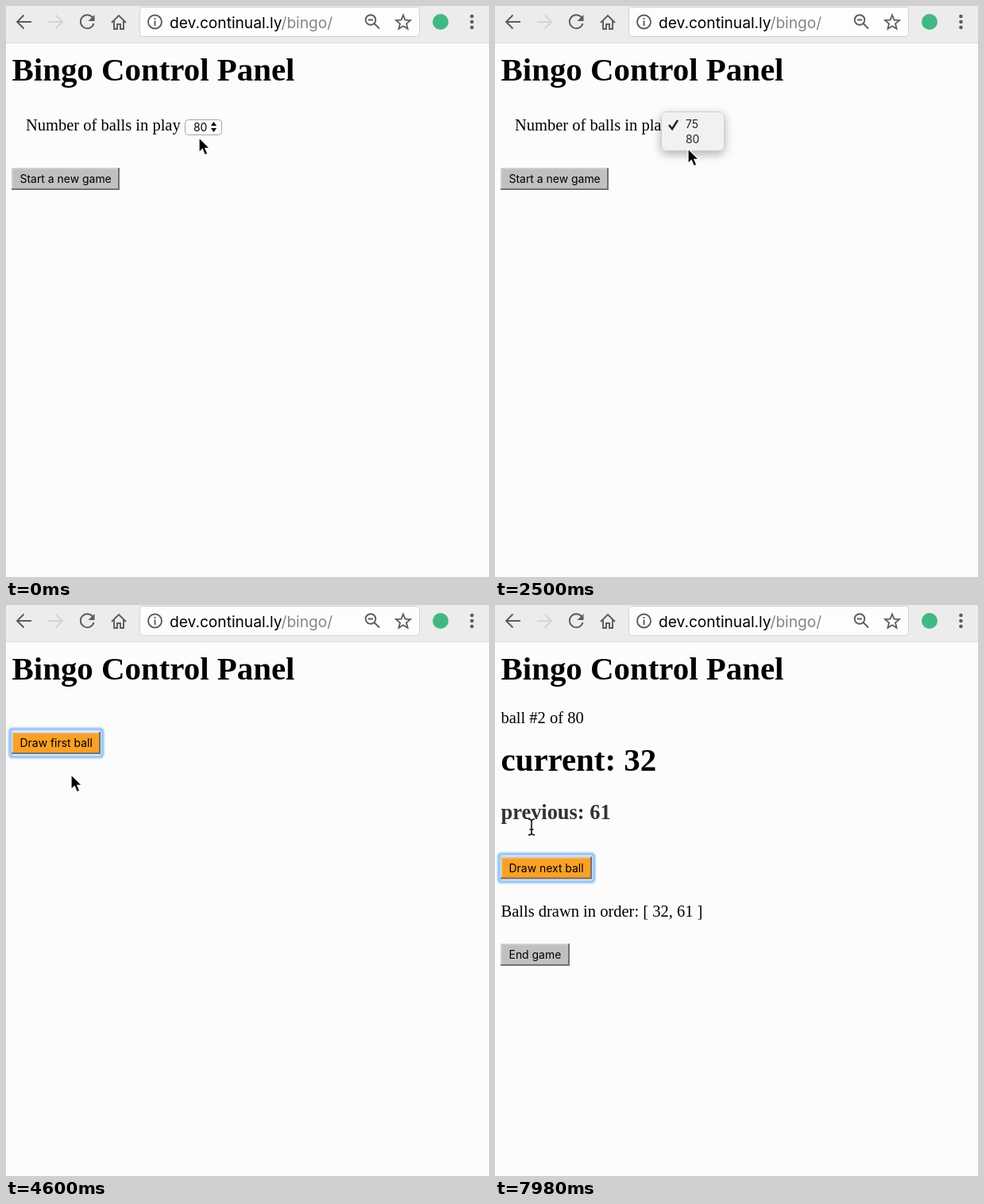
An HTML page for the animation above (8 s loop, 608 by 720 pixels).

```html
<!DOCTYPE html>
<html lang="en">
<head>
<meta charset="utf-8">
<title>Bingo Control Panel</title>
<style>
  html, body { margin: 0; height: 100%; overflow: hidden; background: #fcfcfc; }
  svg { display: block; width: 608px; height: 720px; }
  text { font: 20.5px "Liberation Serif", serif; white-space: pre; }
  .h1 { font-size: 40.9px; font-weight: bold; }
  .h2 { font-size: 26.4px; font-weight: bold; fill: #333; }
  .ui { font: 13.95px Inter, sans-serif; }
  .url { font: 19.15px Inter, sans-serif; }
  .icon { fill: none; stroke: #5c5c5c; stroke-width: 1.9; }
  .ring { fill: none; stroke: #86bdf0; stroke-width: 3.6; filter: url(#soft); }
</style>
</head>
<body>
<svg viewBox="0 0 608 720">
  <defs>
    <filter id="soft" x="-20%" y="-40%" width="140%" height="180%"><feGaussianBlur stdDeviation="0.8"/></filter>
    <filter id="shadow" x="-40%" y="-50%" width="180%" height="220%">
      <feDropShadow dx="0" dy="4" stdDeviation="6" flood-color="#000" flood-opacity=".3"/>
    </filter>
  </defs>

  <rect width="608" height="720" fill="#fcfcfc"/>
  <rect width="608" height="46" fill="#ececec"/>
  <path d="M0 46.5H608" stroke="#dadada"/>
  <rect x="168.500" y="1.500" width="352" height="37" rx="4" fill="#fdfdfd" stroke="#d2d2d2"/>

  <g class="icon">
    <path d="M32 20H14M22.500 11.500L14 20l8.500 8.500"/>
    <path d="M53 20H71M62.500 11.500L71 20l-8.500 8.500" stroke="#d4d4d4"/>
    <path d="M109 14.500A8.500 8.500 0 1 0 110.500 22"/>
    <path d="M111.500 11v8h-8z" fill="#5c5c5c" stroke="none"/>
    <path d="M133 21L142 12l9 9M136 19v10h4v-6h4v6h4V19"/>
    <circle cx="187.500" cy="20" r="8.500"/>
    <path d="M187.500 18.500V25M187.500 15v2"/>
    <circle cx="459" cy="17.500" r="6.300"/>
    <path d="M463.500 22l6.500 6.500M456 17.500h6"/>
    <path id="star" stroke-width="1.800"/>
  </g>
  <g fill="#5c5c5c"><circle cx="586.500" cy="13" r="2.300"/><circle cx="586.500" cy="20" r="2.300"/><circle cx="586.500" cy="27" r="2.300"/></g>
  <circle cx="547" cy="20" r="10" fill="#41b883"/>
  <text class="url" x="206" y="27.500">dev.continual.ly<tspan fill="#858585">/bingo/</tspan></text>
  <text class="h1" x="7.500" y="94">Bingo Control Panel</text>

  <g id="setup">
    <text x="25" y="157">Number of balls in play</text>
    <rect id="selectRing" class="ring" x="223.500" y="140.500" width="50.500" height="25" rx="5"/>
    <rect x="225.500" y="143.500" width="46" height="19" rx="4" fill="#fcfcfc" stroke="#a6a6a6"/>
    <text id="value" class="ui" x="236" y="158"></text>
    <path d="M258 151l3.500-5 3.500 5zM258 154l3.500 5 3.500-5z"/>
  </g>
  <g id="ready"></g>
  <g id="ball1"></g>
  <g id="ball2"></g>

  <g id="popup">
    <rect x="209.500" y="0.500" width="79" height="49" rx="6" fill="#f1f1f1" stroke="#cfcfcf" filter="url(#shadow)"/>
    <rect id="highlight" x="210" width="78.500" height="18.500" fill="#3a90f7"/>
    <path id="check" d="M219 17l4 5 7-11" fill="none" stroke="#222" stroke-width="2.500"/>
    <text id="item0" class="ui" x="240" y="21">75</text>
    <text id="item1" class="ui" x="240" y="39.500">80</text>
  </g>

  <g id="pointer">
    <path id="arrow" d="M0 0V18.500L4.300 14.600 7.300 21.800 10.800 20.300 7.800 13.300H13.500Z" stroke="#fff" stroke-width="1.200"/>
    <path id="ibeam" d="M-4-10Q0-10 0-7Q0-10 4-10M0-7V7M-4 10Q0 10 0 7Q0 10 4 10M-2.500 3h5" fill="none" stroke="#111" stroke-width="1.600"/>
  </g>
</svg>

<script>
const $ = id => document.getElementById(id);
const show = (id, on) => $(id).style.display = on ? '' : 'none';

const GRAY = '#c0c0c0', ORANGE = '#fba026';

const button = (y, width, label, color, focused) => `
  ${focused ? `<rect class="ring" x="5" y="${y - 3.5}" width="${width + 4.5}" height="35" rx="3"/>` : ''}
  <rect x="7" y="${y}" width="${width}" height="28" fill="${color}"/>
  <path d="M8 ${y + 28}V${y + 1}H${7 + width}" fill="none" stroke="#cfcfcf" stroke-width="2"/>
  <path d="M7 ${y + 27}H${6 + width}V${y}" fill="none" stroke="#727272" stroke-width="2"/>
  <text class="ui" x="17.500" y="${y + 19}">${label}</text>`;

const ballScreen = (count, current, drawn, buttonY, focused) => `
  <text x="7.500" y="149">ball #${count} of 80</text>
  <text class="h1" x="7.500" y="209">current: ${current}</text>
  ${button(buttonY, 115, 'Draw next ball', ORANGE, focused)}
  <text x="7.500" y="${buttonY + 75}">Balls drawn in order: [ ${drawn} ]</text>
  ${button(buttonY + 109.5, 87, 'End game', GRAY)}`;

$('setup').innerHTML += button(204, 136, 'Start a new game', GRAY);
$('ready').innerHTML = button(160, 112, 'Draw first ball', ORANGE, true);
$('ball1').innerHTML = ballScreen(1, 61, '61', 265);
$('ball2').innerHTML = ballScreen(2, 32, '32, 61', 317.5, true) +
  '<text class="h2" x="7.500" y="270">previous: 61</text>';

const starPoints = Array.from({ length: 10 }, (_, i) => {
  const angle = i * Math.PI / 5, radius = i % 2 ? 4.2 : 9.5;
  return [500 + radius * Math.sin(angle), 21 - radius * Math.cos(angle)];
});
$('star').setAttribute('d', 'M' + starPoints.join('L') + 'Z');

const LOOP = 8000;
const screens = [['setup', 0], ['ready', 4240], ['ball1', 5400], ['ball2', 7500]];
const popups = [
  { open: 740, close: 1400, top: 115, checked: 1 },
  { open: 2140, close: 3300, top: 133, checked: 0 }
];
// Pointer stops: time, x, y
const stops = [
  [0, 243, 166], [300, 243, 166], [650, 244, 152], [850, 244, 152], [1300, 245, 129],
  [1600, 245, 129], [2000, 244, 153], [2200, 244, 153], [2480, 243, 180], [2800, 243, 180],
  [3150, 244, 168], [3540, 244, 168], [4050, 81, 221], [4300, 81, 221], [4550, 82, 214],
  [4700, 82, 214], [5200, 62, 177], [5600, 62, 177], [6600, 47, 245], [7000, 47, 246],
  [7350, 46, 280], [LOOP, 46, 280]
];

function pointerAt(t) {
  const i = stops.findIndex(stop => stop[0] > t);
  const [t0, x0, y0] = stops[i - 1], [t1, x1, y1] = stops[i];
  const u = (t - t0) / (t1 - t0), eased = u * u * (3 - 2 * u);
  return [x0 + (x1 - x0) * eased, y0 + (y1 - y0) * eased];
}

function drawPopup(t, y) {
  const fade = 140;
  const popup = popups.find(p => t >= p.open && t < p.close + fade);
  show('popup', popup);
  if (!popup) return;
  const row = Math.floor((y - popup.top - 6) / 18.5);
  $('popup').setAttribute('transform', `translate(0 ${popup.top})`);
  $('popup').setAttribute('opacity', Math.min(1, 1 - (t - popup.close) / fade));
  show('highlight', row === 0 || row === 1);
  $('highlight').setAttribute('y', 6.5 + 18.5 * row);
  $('check').setAttribute('transform', `translate(0 ${18.5 * popup.checked})`);
  $('check').setAttribute('stroke', row === popup.checked ? '#fff' : '#222');
  [0, 1].forEach(i => $('item' + i).setAttribute('fill', row === i ? '#fff' : '#222'));
}

function render() {
  const t = performance.now() % LOOP;
  const [x, y] = pointerAt(t);
  const screen = screens.filter(s => s[1] <= t).pop()[0];
  screens.forEach(([id]) => show(id, id === screen));
  show('selectRing', t >= 740);
  $('value').textContent = t >= 1560 && t < 3540 ? '75' : '80';
  drawPopup(t, y);

  const overText = screen === 'ball2' || (screen === 'ball1' && y < 216);
  show('arrow', !overText);
  show('ibeam', overText);
  $('pointer').setAttribute('transform', `translate(${x} ${y})`);
  requestAnimationFrame(render);
}
render();
</script>
</body>
</html>
```
